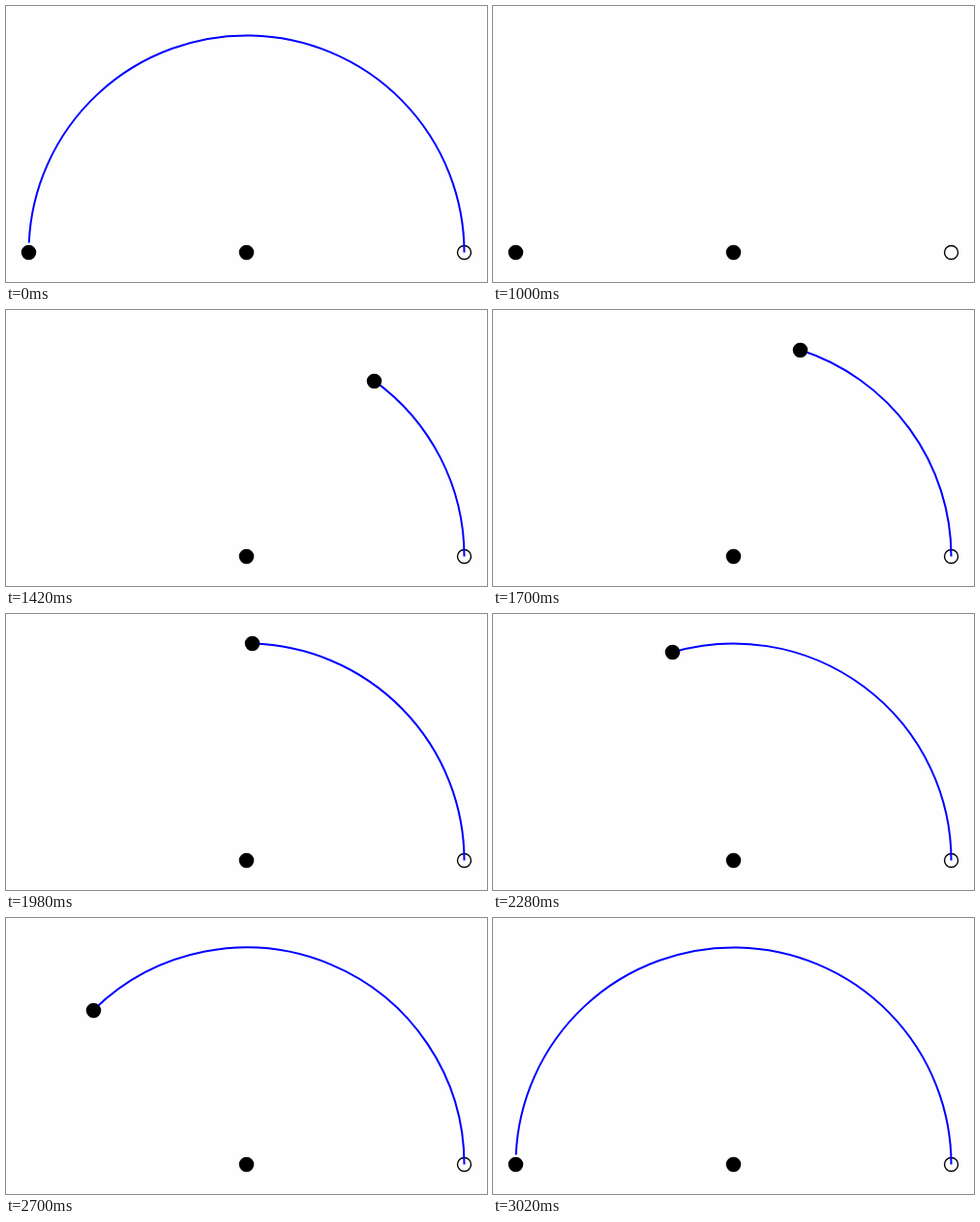
An HTML page for the animation above (4 s loop, 497 by 285 pixels).

```html
<!DOCTYPE html>
<html lang="en">
<head>
<meta charset="utf-8">
<title>Half circle</title>
<style>
  html, body { margin: 0; width: 100%; height: 100%; overflow: hidden; background: #fefefe; }
  svg { display: block; }
</style>
</head>
<body>
<svg width="497" height="285" viewBox="0 0 497 285">
  <circle cx="473.5" cy="254.5" r="7" fill="none" stroke="#000" stroke-width="1.4"/>
  <path id="arc" fill="none" stroke="#00f" stroke-width="2"/>
  <circle cx="248.5" cy="254.5" r="7.75"/>
  <circle id="dot" r="7.75"/>
</svg>
<script>
  const LOOP = 4000, START = 1000, STEP = 20, LAST = 101;
  const CX = 248.5, CY = 254.5, RX = 225, RY = 224;
  const EDGE = -0.999 * RX; // the curve stops just short of its left end
  // [step, horizontal offset from the centre]
  const KEYS = [[1, 221], [21, 132], [49, 6], [53, -13], [64, -63], [80, -135], [85, -158], [100, -225]];
  const arc = document.getElementById('arc');
  const dot = document.getElementById('dot');

  function offsetAt(step) {
    const i = Math.max(1, KEYS.findIndex(([k]) => k >= step));
    const [k0, x0] = KEYS[i - 1], [k1, x1] = KEYS[i];
    return x0 + (x1 - x0) * (step - k0) / (k1 - k0);
  }

  const heightAt = dx => RY * Math.sqrt(1 - (dx / RX) ** 2);

  function place(x, y) {
    dot.setAttribute('cx', x);
    dot.setAttribute('cy', y);
  }

  function draw(time) {
    const step = Math.floor((time % LOOP - START) / STEP + 1e-6);
    const moving = step > 0 && step < LAST;
    const dx = moving ? Math.max(EDGE, offsetAt(step)) : EDGE;
    const x = CX + dx, y = CY - heightAt(dx);
    arc.setAttribute('d', step === 0 ? '' : `M${CX + RX} ${CY}A${RX} ${RY} 0 0 0 ${x} ${y}`);
    if (moving) place(Math.round(x - 0.5) + 0.5, Math.round(y - 0.5) + 0.5);
    else place(CX - RX, CY);
  }

  function tick() {
    draw(performance.now());
    requestAnimationFrame(tick);
  }
  tick();
</script>
</body>
</html>
```
